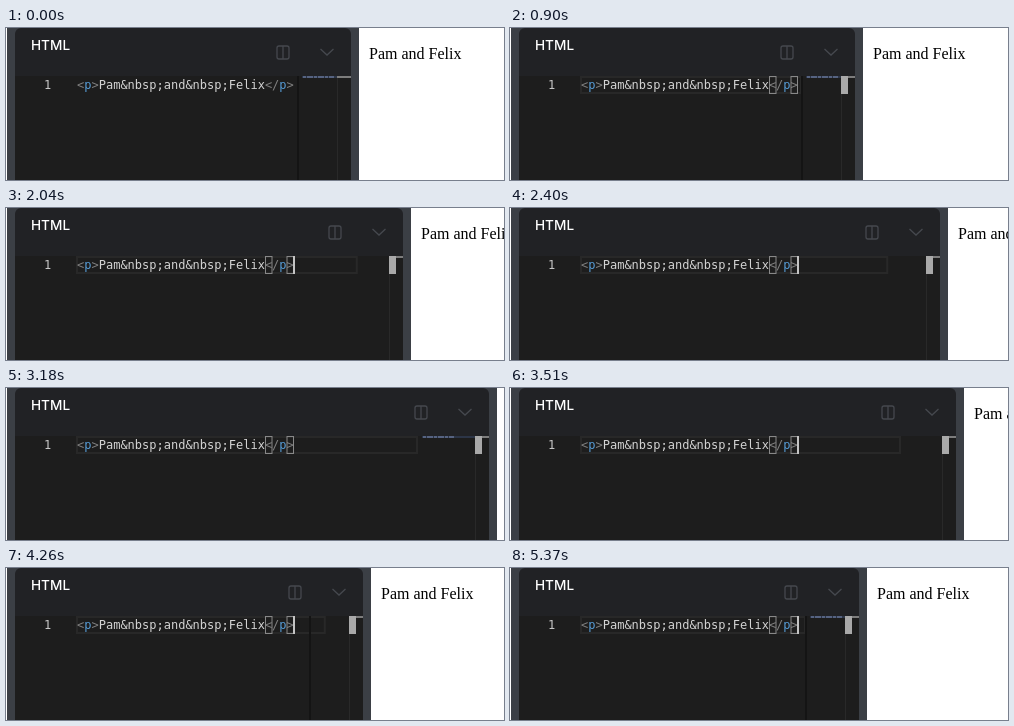
An HTML page for the animation above (5.55 s loop, 498x152 px).

```html
<!DOCTYPE html>
<html lang="en">
<head>
<meta charset="utf-8">
<title>Resizable code pane</title>
<style>
  html, body { margin: 0; width: 100%; height: 100%; overflow: hidden; background: #fff; }
  svg { display: block; }
  .code { font: 12px "DejaVu Sans Mono", monospace; fill: #d4d4d4; }
  .tag { fill: #808080; }
  .name { fill: #569cd6; }
  .label { font: 500 13.6px Inter, sans-serif; fill: #fff; }
  .page { font: 16px "Liberation Serif", serif; }
  .line { fill: none; stroke: #45484e; stroke-width: 1.3; }
  .box { fill: none; stroke: #888; }
</style>
</head>
<body>
<svg width="498" height="152" viewBox="0 0 498 152">
  <rect x="1" width="497" height="152" fill="#3b3f45"/>
  <rect id="header" x="9" width="336" height="60" rx="6" fill="#212225"/>
  <rect id="editor" x="9" y="48" width="336" height="104" fill="#1d1d1d"/>
  <text class="label" x="25" y="22">HTML</text>
  <rect id="current" x="71" y="49" height="16" fill="none" stroke="#282828" stroke-width="2"/>

  <g id="edge">
    <rect width="498" height="152" fill="#fff"/>
    <text class="page" x="10" y="31">Pam and Felix</text>
    <g class="line">
      <rect x="-82" y="18" width="12" height="13" rx="2"/>
      <path d="M-76 18v13M-38.5 21l6.5 6 6.5-6"/>
    </g>
    <rect id="shadow" x="-62" y="48" width="2" height="104" fill="#141414"/>
    <path d="M-21.5 48v104" stroke="#292929"/>
    <rect x="-22" y="48" width="14" height="2" fill="#7d7d7d"/>
    <rect id="marker" x="-22" y="48" width="7" height="18" fill="#a9a9a9"/>
  </g>

  <g id="minimap">
    <rect id="mapLine" y="48" height="2" fill="#2c3547"/>
    <path d="M1 49h31" stroke="#566381" stroke-width="2" stroke-dasharray="3 1 6 1"/>
  </g>

  <text class="code" x="38" y="61" style="fill:#c6c6c6">1</text>
  <text class="code" x="71" y="61"><tspan class="tag">&lt;</tspan><tspan class="name">p</tspan><tspan class="tag">&gt;</tspan>Pam&amp;nbsp;and&amp;nbsp;Felix<tspan class="tag">&lt;/</tspan><tspan class="name">p</tspan><tspan class="tag">&gt;</tspan></text>
  <g id="brackets" class="box">
    <rect x="259.5" y="48.5" width="6.5" height="17"/>
    <rect x="281" y="48.5" width="6.5" height="17"/>
  </g>
  <rect id="cursor" x="287" y="48" width="2" height="18" fill="#c4c4c4"/>
</svg>
<script>
const LOOP = 5550, STEP = 30;
// [time, x of the divider's right side]
const drag = [
  [0, 353], [1560, 353], [1680, 369], [2130, 414], [2400, 438], [2700, 491],
  [3330, 491], [3720, 411], [3900, 377], [4260, 365], [4470, 357], [LOOP, 357]
];
const $ = id => document.getElementById(id);
const set = (id, name, value) => $(id).setAttribute(name, value);
const show = (id, on) => set(id, "visibility", on ? "visible" : "hidden");
const within = (t, ...spans) => spans.some(([a, b]) => t >= a && t < b);

function dividerAt(t) {
  const i = drag.findIndex(([end]) => end > t);
  const [t0, x0] = drag[i - 1], [t1, x1] = drag[i];
  return Math.round(x0 + (x1 - x0) * (t - t0) / (t1 - t0));
}

function draw(now) {
  const t = Math.floor(now % LOOP / STEP) * STEP;
  const x = dividerAt(t);
  const focused = t >= 450;
  const dragging = within(t, [1590, 2730], [3360, 4470]);
  const wide = x > 450;
  const mapX = x - (wide ? 75 : 57);
  const lineEnd = dragging ? 323 + 0.8 * (x - 369) : mapX - 4;

  set("header", "width", x - 17);
  set("editor", "width", x - 17);
  set("edge", "transform", `translate(${x})`);
  set("minimap", "transform", `translate(${mapX})`);
  set("mapLine", "width", x - 22 - mapX);
  set("current", "width", lineEnd - 72);

  show("minimap", !dragging);
  show("shadow", x < 385);
  show("current", focused);
  show("marker", focused);
  show("brackets", focused);
  show("cursor", focused && !within(t, [900, 1350], [3180, 3360], [4920, 5370]));
}

const start = performance.now();
function tick() {
  draw(performance.now() - start);
  requestAnimationFrame(tick);
}
tick();
</script>
</body>
</html>
```
